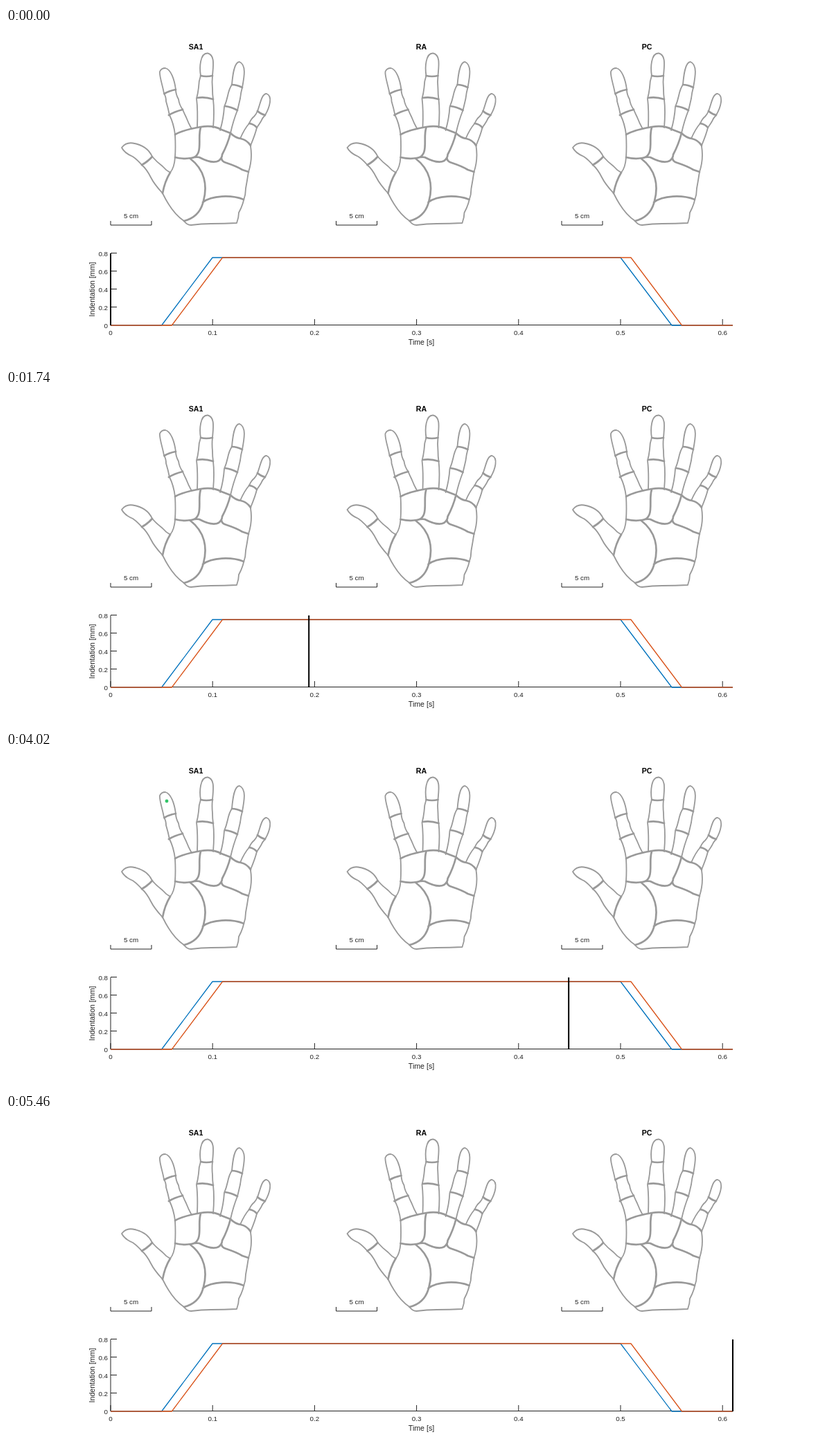
Write an HTML page that moves like this. It is 1159 px wide and 483 px high and loops after 5.49 s.

```html
<!DOCTYPE html>
<html lang="en">
<head>
<meta charset="utf-8">
<title>Afferent responses</title>
<style>
html, body { margin: 0; width: 100%; height: 100%; overflow: hidden; background: #fff; }
svg { display: block; width: 1159px; height: 483px; font: 9.8px "Liberation Sans", Arial, sans-serif; fill: #222; }
path, line { fill: none; stroke-linejoin: round; }
.hand { stroke: #999; stroke-linecap: round; }
.axis { stroke: #222; stroke-width: 1; }
.trace { stroke-width: 1.3; }
.dots { stroke-width: 4.9; stroke-linecap: round; }
.title { font-weight: bold; font-size: 10.6px; fill: #000; }
.label { font-size: 10.6px; }
.mid { text-anchor: middle; }
.end { text-anchor: end; }
</style>
</head>
<body>
<svg id="stage" viewBox="0 0 1159 483">
  <defs>
    <g id="hand" class="hand">
      <g stroke-width="1.8">
        <path d="M244 154Q242 138 236 126Q234 116 231 106Q231 99 228 95C227 86 221 70 222 63Q224 58 230 58C238 60 243 74 245 89Q245 96 249 103Q250 111 255 118Q257 123 260 129Q263 137 268 146"/>
        <path d="M276 143Q277 119 275 102Q277 95 278 86Q278 77 281 69C279 57 280 36 291 36.5C302 39 299 55 298 69Q297 78 298 88Q298 96 299 103Q301 120 299 144"/>
        <path d="M309 148Q314 131 315 114Q318 107 320 98Q322 88 326 82C327 70 329 49 337 49C347 53 344 70 341 86Q339 93 338 102Q336 111 334 119Q328 134 324 152"/>
        <path d="M338 160Q344 146 351 138Q354 131 358 128Q361 125 363 120C367 110 369 95 376 95C385 98 381 114 374 126Q370 130 368 135Q365 140 362 144Q360 153 353 170"/>
        <path d="M226 239Q214 226 209 216Q203 204 196 198Q189 190 183 186Q171 181 167 173Q173 165 183 166.500Q204 170 211 186Q218 194 226 200Q231 206 237 209"/>
        <path d="M244 154Q245 172 244 187Q243 202 237 209M226 239Q240 268 257 279Q261 285 267 285Q282 283 296 283Q315 283 333 282Q336 274 336 267Q341 258 343 249Q346 241 346 232Q348 221 350 208Q356 190 353 171"/>
      </g>
      <g stroke-width="2.7">
        <path d="M228.500 95Q235 91 245 89M235 126Q243 121 255 118M281 69Q289 71 298 69M276 101Q287 99 299 103M326 82Q333 82 341 86M316 113Q325 114 334 119M363 120Q367 124 374 126M351 138Q358 139 362 144M196 198Q205 193 211 186"/>
        <path d="M226 239Q229 222 237 209M257 279C277 274 283 259 285 250C291 228 287 205 266 189M284 252C297 242 325 241 343 248"/>
        <path d="M244 154Q257 147 281 143Q299 140 311 147L324 152Q331 159 339 160Q348 162 353 170"/>
        <path d="M244 187Q257 190 267 188Q278 187 279 173C280 162 278 153 281 144M268 188Q274 186 279 187Q298 197 307 192Q312 188 312 183Q320 168 324 152M311 188Q311 193 318 195Q333 200 341 205L350 208"/>
      </g>
    </g>
  </defs>
  <g id="panels"></g>
  <g id="axes"></g>
  <path class="trace" stroke="#0072bd" d="M151 430H224.600L298 332H887L961 430H1049"/>
  <path class="trace" stroke="#d95319" d="M151 430H239.300L312.500 332H902L975.500 430H1049"/>
  <text class="label mid" x="599.500" y="458">Time [s]</text>
  <text class="label mid" transform="translate(128 378) rotate(-90)">Indentation [mm]</text>
  <line id="cursor" y1="326" y2="430" stroke="#000" stroke-width="2"/>
</svg>
<script>
const FRAMES = 183, STEP = 30, PITCH = 325.5;
const $ = id => document.getElementById(id);
const panels = [["SA1", "#33c568"], ["RA", "#087fc2"], ["PC", "#f68220"]];

$("panels").innerHTML = panels.map(([name, color], i) => `
  <g transform="translate(${i * PITCH} 0)">
    <text class="title mid" x="274" y="31">${name}</text>
    <use href="#hand"/>
    <path class="axis" d="M151 279V285H210V279"/>
    <text class="mid" x="180.500" y="274.500">5 cm</text>
    <path class="dots" stroke="${color}"/>
  </g>`).join("");

let axes = '<path class="axis" d="M151 326V429.500H1049"/>';
for (let i = 0; i < 5; i++) {
  const y = 430 - 26 * i;
  axes += `<path class="axis" d="M151 ${y - .5}h9"/><text class="end" x="147" y="${y + 3.5}">${i / 5}</text>`;
}
for (let i = 0; i < 7; i++) {
  const x = 151 + 147.2 * i;
  axes += `<path class="axis" d="M${x} 430v-9"/><text class="mid" x="${x}" y="443.500">${i / 10}</text>`;
}
$("axes").innerHTML = axes;

// Repeatable noise in 0..1
function noise(a, b) {
  let h = Math.imul(a + 1, 0x9e3779b1) ^ Math.imul(b + 7, 0x85ebca6b);
  h = Math.imul(h ^ h >>> 15, 0x2c1b3c6d);
  h = Math.imul(h ^ h >>> 13, 0x297a2d39);
  return ((h ^ h >>> 16) >>> 0) / 2 ** 32;
}

// Pressed pads: centre, half axis, half width, frames of the press and release ramps
const pads = [
  { x: 233.5, y: 76, dx: 3, dy: 15, w: 8, on: 19, off: 154 },
  { x: 190, y: 180, dx: 16, dy: 9, w: 9, on: 16, off: 151 }
];
const counts = [36, 80, 60];
const joint = [[231.5, 113], [240, 114], [242, 119], [252, 115], [238, 124], [237, 128], [249, 125], [257, 130]];

const units = [];
const addUnit = (kind, pad, x, y) => units.push({ kind, pad, x, y });
counts.forEach((n, kind) => pads.forEach((p, k) => {
  const len = Math.hypot(p.dx, p.dy);
  for (let i = 0; i < n; i++) {
    const seed = 1000 * kind + 300 * k + i;
    const r = noise(seed, 901) ** (kind ? .75 : .55), a = 2 * Math.PI * noise(seed, 902);
    const u = r * Math.cos(a), v = r * Math.sin(a) * p.w / len;
    addUnit(kind, p, p.x + u * p.dx - v * p.dy, p.y + u * p.dy + v * p.dx);
  }
}));
joint.forEach(([x, y]) => addUnit(0, pads[0], x, y));

// Vibration reaching the rest of the hand: x1, y1, x2, y2, spread
const bones = [[290, 42, 288, 138, 6], [336, 55, 317, 143, 6], [376, 100, 348, 156, 4], [252, 165, 340, 185, 14], [250, 225, 330, 255, 20]];
bones.forEach(([x1, y1, x2, y2, s], k) => {
  for (let i = 0; i < 14; i++) {
    const seed = 5000 + 100 * k + i, q = noise(seed, 1);
    addUnit(2, null, x1 + (x2 - x1) * q + s * (2 * noise(seed, 2) - 1), y1 + (y2 - y1) * q + s * (noise(seed, 3) - .5));
  }
});

// Regularly firing units: kind, x, y, period, phase, first, last
const regular = [
  [0, 232, 71, 12, 2, 58, 153], [0, 236, 79, 9, 2, 36, 153], [0, 228, 78, 8, 1, 36, 153],
  [0, 233, 86, 14, 5, 36, 153], [0, 231, 60.5, 121, 120, 36, 153], [0, 192, 185, 10, 2, 35, 150],
  [0, 185.5, 182, 13, 0, 58, 150], [0, 196, 181, 11, 4, 35, 150], [0, 201, 187, 15, 3, 35, 150],
  [1, 202.5, 175, 17, 0, 16, 34], [1, 213.5, 206, 12, 7, 151, 166]
];

// Firing chance of a unit in one frame
function chance({ kind, pad }, f) {
  if (!pad) return f > 19 && f < 23 ? .5 : 0;
  const on = f - pad.on, off = f - pad.off;
  const pressing = on >= 0 && on < 16, releasing = off >= 0 && off < 16;
  const jolt = on === 0 || on === 1 || on === 15;
  if (kind === 0) return pressing ? (jolt ? .8 : .35) : on > 18 && on < 38 ? .02 : 0;
  if (kind === 1) return pressing ? (jolt ? .95 : .45) : releasing ? .55 : off > 15 && off < 20 ? .03 : 0;
  return pressing ? (jolt ? .9 : .3) : off === 0 || off === 1 ? .4 : 0;
}

const dots = document.querySelectorAll(".dots"), cursor = $("cursor");
let shown = -1;
function draw(f) {
  const d = ["", "", ""];
  const dot = (kind, x, y) => d[kind] += `M${x.toFixed(1)} ${y.toFixed(1)}h.01`;
  units.forEach((u, i) => {
    if (noise(i, f + 2000) < chance(u, f)) dot(u.kind, u.x, u.y);
  });
  for (const [kind, x, y, period, phase, first, last] of regular)
    if (f >= first && f <= last && f % period === phase) dot(kind, x, y);
  dots.forEach((path, i) => path.setAttribute("d", d[i]));
  const x = 151 + 898 * f / (FRAMES - 1);
  cursor.setAttribute("x1", x);
  cursor.setAttribute("x2", x);
}

function tick() {
  const f = Math.floor(performance.now() / STEP) % FRAMES;
  if (f !== shown) draw(shown = f);
  requestAnimationFrame(tick);
}
tick();
</script>
</body>
</html>
```
